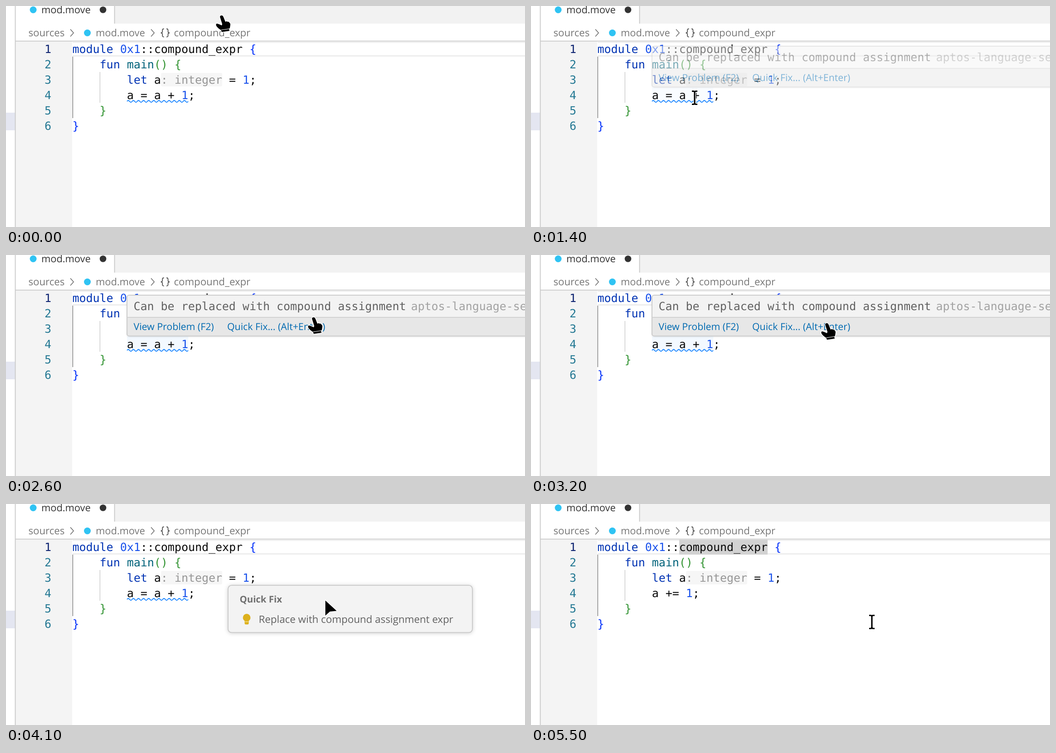
An HTML page that plays this animation: 1145x489 px, repeating every 6000 ms.

```html
<!DOCTYPE html>
<html lang="en">
<head>
<meta charset="utf-8">
<title>Quick fix</title>
<style>
html, body { margin: 0; width: 100%; height: 100%; overflow: hidden; background: #fff; }
svg { display: block; width: 1145px; height: 489px; }
text { white-space: pre; text-rendering: geometricPrecision; }
.mono { font: 24.96px "DejaVu Sans Mono", monospace; fill: #080808; }
.ui { font: 22.2px "Open Sans", sans-serif; fill: #767676; }
.ui .link { font-size: 21.3px; fill: #006ab1; }
.num { fill: #237893; }
.kw { fill: #0033b3; }
.lit { fill: #1750eb; }
.fn { fill: #00627a; }
.b1 { fill: #0431fa; }
.b2 { fill: #319331; }
.hint { fill: #969696; }
.line { fill: none; stroke: #c8c8c8; stroke-width: 1.8; }
.icon { fill: none; stroke: #767676; stroke-width: 1.8; }
.menu { filter: drop-shadow(0 1px 4px rgba(0, 0, 0, .18)); }
.tip { filter: drop-shadow(0 1px 2px rgba(0, 0, 0, .12)); }

/* Every state change is a hard step on one 6 s clock. */
.a { animation: 6s step-end infinite; }
.crumb { animation-name: crumb; }
.hover { animation-name: hover; }
.popup { animation-name: popup; }
.row { animation-name: row; }
.label { animation-name: label; }
.before { animation-name: before; }
.after { animation-name: after; }
.caret { animation-name: caret; }
.mouse { animation-name: mouse; }
.hand { animation-name: hand; }
.beam { animation-name: beam; }
.arrow { animation-name: arrow; }

@keyframes crumb { 0%, 6.66%, 100% { fill: #767676 } 5% { fill: #4e4e4e } }
@keyframes hover { 0%, 58.33%, 100% { opacity: 0 } 23.33% { opacity: .5 } 25% { opacity: 1 } }
@keyframes popup { 0%, 83.33%, 100% { opacity: 0 } 58.33% { opacity: 1 } }
@keyframes row { 0%, 83.33%, 100% { opacity: 0 } 70% { opacity: 1 } }
@keyframes label { 0%, 83.33%, 100% { fill: #616161 } 70% { fill: #fff } }
@keyframes before { 0%, 100% { opacity: 1 } 83.33% { opacity: 0 } }
@keyframes after { 0%, 100% { opacity: 0 } 83.33% { opacity: 1 } }
@keyframes caret { 0%, 91.66%, 100% { opacity: 0 } 83.33% { opacity: 1 } }
@keyframes hand { 0%, 41.66%, 100% { opacity: 1 } 6.66%, 58.33% { opacity: 0 } }
@keyframes beam { 0%, 41.66%, 100% { opacity: 0 } 6.66%, 81.66% { opacity: 1 } }
@keyframes arrow { 0%, 81.66%, 100% { opacity: 0 } 58.33% { opacity: 1 } }
@keyframes mouse {
  0%, 100% { transform: translate(474px, 22px) }
  3.33% { transform: translate(468px, 33px) }
  5% { transform: translate(451px, 61px) }
  6.66% { transform: translate(429px, 99px) }
  8.33% { transform: translate(406px, 140px) }
  10% { transform: translate(384px, 179px) }
  11.66% { transform: translate(367px, 207px) }
  13.33% { transform: translate(361.5px, 218px) }
  16.66% { transform: translate(361px, 216px) }
  18.33% { transform: translate(361px, 211px) }
  20% { transform: translate(361px, 206px) }
  21.66% { transform: translate(361px, 203px) }
  35% { transform: translate(374px, 201px) }
  40% { transform: translate(452px, 184px) }
  41.66% { transform: translate(598px, 156px) }
  43.33% { transform: translate(677px, 139px) }
  46.66% { transform: translate(674px, 141px) }
  50% { transform: translate(666px, 145px) }
  51.66% { transform: translate(657px, 149px) }
  53.33% { transform: translate(651px, 152px) }
  66.66% { transform: translate(672px, 176px) }
  68.33% { transform: translate(704px, 212px) }
  70% { transform: translate(727px, 238px) }
  71.66% { transform: translate(742px, 252px) }
  73.33% { transform: translate(749px, 259px) }
  75% { transform: translate(752px, 261px) }
}
</style>
</head>
<body>
<svg viewBox="0 0 1145 489">
  <defs>
    <path id="ibeam" d="M-6 -14.5H-3Q0 -14.5 0 -11.5Q0 -14.5 3 -14.5H6M0 -11.5V11.5M-6 14.5H-3Q0 14.5 0 11.5Q0 14.5 3 14.5H6" fill="none"/>
  </defs>

  <!-- window chrome -->
  <rect y="236" width="20" height="39" fill="#e4e6f1"/>
  <rect x="21" y="78" width="125" height="411" fill="#f4f4f4"/>
  <rect x="240" width="905" height="39" fill="#f2f2f2"/>
  <path class="line" d="M20.5 0V489M239.5 0V39M21 77.6H1145"/>
  <g class="ui">
    <circle cx="60" cy="8.500" r="7.500" fill="#2fc3f3"/>
    <text x="78" y="16" font-size="21.8" style="font-size:21.8px;fill:#333">mod.move</text>
    <circle cx="214" cy="8.500" r="7.300" fill="#333"/>
    <text x="49.500" y="67">sources</text>
    <text x="198" y="67" style="font-size:21.8px">mod.move</text>
    <circle cx="179.500" cy="59.500" r="7.500" fill="#2fc3f3"/>
    <text class="a crumb" x="370.500" y="67">compound_expr</text>
  </g>
  <path class="icon" d="M142 51.500l7 8-7 8M320 51.500l7 8-7 8"/>
  <path class="icon" style="stroke:#555" d="M348.500 50.500Q345 50.500 345 54V56.500Q345 59.500 341.500 59.500Q345 59.500 345 62.500V65Q345 68.500 348.500 68.500M354 50.500Q357.500 50.500 357.500 54V56.500Q357.500 59.500 361 59.500Q357.500 59.500 357.500 62.500V65Q357.500 68.500 354 68.500"/>

  <!-- editor -->
  <path d="M147 80H1145M147 110.300H1145" stroke="#eee" stroke-width="3.200"/>
  <rect class="a after" x="327" y="79" width="195" height="33" fill="#d2d2d2"/>
  <rect class="a hover" x="267" y="180" width="135" height="34" fill="#f3f9ff"/>
  <rect x="342" y="148" width="135" height="30" rx="3" fill="#f6f6f6"/>
  <path d="M147.300 112V248" stroke="#939393" stroke-width="1.800"/>
  <path d="M207.300 146V214" stroke="#d3d3d3" stroke-width="1.800"/>
  <g class="mono">
    <text class="num" x="85" y="104" style="fill:#0b216f">1</text>
    <text class="num" x="85" y="138">2</text>
    <text class="num" x="85" y="172">3</text>
    <text class="num" x="85" y="206">4</text>
    <text class="num" x="85" y="240">5</text>
    <text class="num" x="85" y="274">6</text>
    <text x="146.500" y="104"><tspan class="kw">module</tspan> <tspan class="lit">0x1</tspan>::compound_expr <tspan class="b1">{</tspan></text>
    <text x="206.600" y="138"><tspan class="kw">fun</tspan> <tspan class="fn">main</tspan><tspan class="b2">() {</tspan></text>
    <text x="266.700" y="172"><tspan class="kw">let</tspan> a<tspan class="hint">: integer</tspan> = <tspan class="lit">1</tspan>;</text>
    <text class="a before" x="266.700" y="206">a = a + <tspan class="lit">1</tspan>;</text>
    <text class="a after" opacity="0" x="266.700" y="206">a += <tspan class="lit">1</tspan>;</text>
    <text class="b2" x="206.600" y="240">}</text>
    <text class="b1" x="146.500" y="274">}</text>
  </g>
  <path class="a before" id="wave" fill="none" stroke="#1a85ff" stroke-width="1.800"/>
  <rect class="a caret" x="521.200" y="78" width="2.800" height="34"/>

  <!-- diagnostic hover -->
  <g class="a hover">
    <g class="tip">
      <rect x="266.900" y="88.900" width="900" height="90.500" rx="5" fill="#f3f3f3"/>
      <path d="M267 138H1160V179.400H272Q267 179.400 267 174.400Z" fill="#e7e7e7"/>
    </g>
    <rect class="line" x="266.900" y="88.900" width="900" height="90.500" rx="5"/>
    <path class="line" style="stroke:#d2d2d2" d="M267 138H1145"/>
    <text class="mono" x="281.500" y="121.500" style="fill:#616161">Can be replaced with compound assignment</text>
    <text class="mono" x="893.500" y="121.500" style="fill:#a2a2a2">aptos-language-server</text>
    <g class="ui">
      <text class="link" x="281.500" y="166">View Problem (F2)</text>
      <text class="link" x="488" y="166">Quick Fix... (Alt+Enter)</text>
    </g>
  </g>

  <!-- quick fix menu -->
  <g class="a popup">
    <rect class="menu" x="489.900" y="179.900" width="539" height="104.500" rx="8" fill="#f3f3f3" stroke="#c8c8c8" stroke-width="1.800"/>
    <text class="ui" x="515.500" y="218" style="font-size:20.4px;font-weight:700;fill:#707070">Quick Fix</text>
    <rect class="a row" x="498" y="234" width="523" height="43" rx="5" fill="#0060c0"/>
    <path d="M531 243A8.500 8.500 0 0 0 526.500 258.500V264Q526.500 266.500 529 266.500H533Q535.500 266.500 535.500 264V258.500A8.500 8.500 0 0 0 531 243Z" fill="#ddb11d"/>
    <path d="M527.500 260.500H534.500" stroke="#f3e3a0" stroke-width="1.400"/>
    <text class="ui a label" x="557.500" y="263" style="font-size:22.35px">Replace with compound assignment expr</text>
  </g>

  <!-- pointer -->
  <g class="a mouse">
    <g class="a hand">
      <path d="M-2 2Q-1 -2 3 -1Q5 0 6 3L10 13Q13 11 15 13Q18 12 19 15Q21 16 21 19L20 26L18 29L19 33L2 35.500L0 31Q-7 27 -10 22Q-12 17 -8 17Q-4 18 2 21L3 18Z" stroke="#fff" stroke-width="3" stroke-linejoin="round" paint-order="stroke"/>
      <path d="M.5 31L18.500 28.500" stroke="#fff" stroke-width="1.200"/>
    </g>
    <g class="a beam">
      <use href="#ibeam" stroke="#fff" stroke-width="6"/>
      <use href="#ibeam" stroke="#000" stroke-width="3.200"/>
    </g>
    <path class="a arrow" d="M.5 1.500V35L10.500 26L25.500 24.500Z" stroke="#fff" stroke-width="3.200" stroke-linejoin="round" paint-order="stroke"/>
  </g>
</svg>
<script>
// Squiggle: 12 even waves under the expression.
const half = 135 / 24;
let d = "M267 212.500";
for (let i = 0; i < 24; i++) d += `q${half / 2} ${i % 2 ? 4 : -4} ${half} 0`;
document.getElementById("wave").setAttribute("d", d.replace("212.500", "211"));
</script>
</body>
</html>
```
